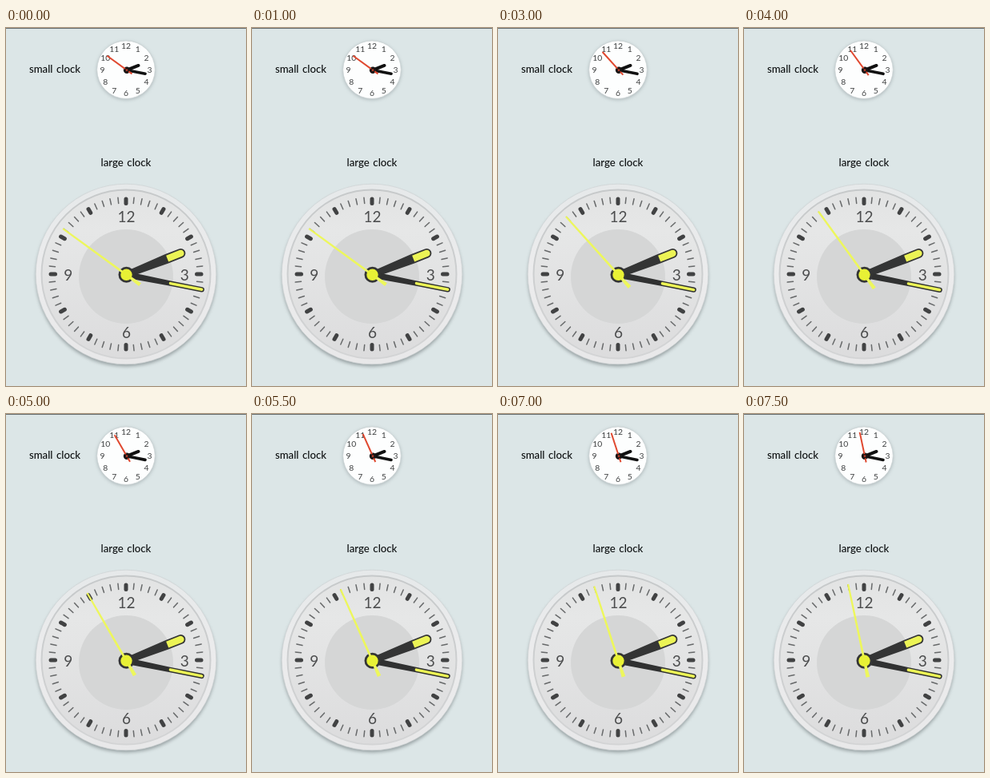
These frames come from a looping animation (300x448 px, 8 s). An HTML page:

```html
<!DOCTYPE html>
<html lang="en">
<head>
<meta charset="utf-8">
<title>Two clocks</title>
<style>
html, body { margin: 0; width: 100%; height: 100%; overflow: hidden; background: #dce6e7; }
svg { display: block; }
text { font-family: Lato, "Open Sans", sans-serif; text-anchor: middle; }
.label { font-size: 13.2px; font-weight: 500; word-spacing: 1.2px; fill: #0c0f10; }
.small text { font-size: 10.4px; fill: #3e4041; }
.large text { font-size: 19px; fill: #4c4d4e; }
</style>
</head>
<body>
<svg width="300" height="448" viewBox="0 0 300 448">
  <defs>
    <linearGradient id="rim" x2="0" y2="1">
      <stop offset="0" stop-color="#e6e9ea"/>
      <stop offset=".5" stop-color="#ececed"/>
      <stop offset="1" stop-color="#e8e8e9"/>
    </linearGradient>
    <linearGradient id="lip" x2="0" y2="1">
      <stop offset="0" stop-color="#c6c9ca"/>
      <stop offset="1" stop-color="#d3d4d5"/>
    </linearGradient>
    <linearGradient id="face" x2="0" y2="1">
      <stop offset="0" stop-color="#e2e3e3"/>
      <stop offset=".25" stop-color="#e6e7e7"/>
      <stop offset="1" stop-color="#dcdcdd"/>
    </linearGradient>
    <filter id="blur" x="-20%" y="-20%" width="140%" height="140%">
      <feGaussianBlur stdDeviation="2.2"/>
    </filter>
  </defs>
  <path d="M0 .5H300" stroke="#686f71"/>
  <text class="label" x="61" y="56">small clock</text>
  <text class="label" x="150" y="173">large clock</text>

  <g class="small" transform="translate(150 52.2)">
    <circle cy="1.3" r="36.5" fill="#8e999c" opacity=".6" filter="url(#blur)"/>
    <circle r="36.3" fill="#fdfefe" stroke="#cbd2d4" stroke-width=".8"/>
    <g id="smallNumbers"></g>
    <g transform="translate(1 .5)" stroke-linecap="round">
      <path class="hour" d="M0 0V-15.6" stroke="#111" stroke-width="4"/>
      <path class="minute" d="M0 0V-23.5" stroke="#111" stroke-width="3.6"/>
      <circle r="4.2" fill="#161515"/>
      <path class="second" d="M0 8V-30.5" stroke="#e0482f" stroke-width="2" stroke-linecap="butt"/>
      <circle r="2.8" fill="#241817"/>
      <circle r="1.1" fill="#e0482f"/>
    </g>
  </g>

  <g class="large" transform="translate(150 308)">
    <circle cy="3" r="112.5" fill="#6f797b" opacity=".65" filter="url(#blur)"/>
    <circle r="112.8" fill="url(#rim)" stroke="#cfd3d4" stroke-width=".7"/>
    <circle r="105.5" fill="url(#face)" stroke="url(#lip)" stroke-width="2"/>
    <circle cy="3" r="59" fill="#d5d6d6"/>
    <g id="ticks" stroke-linecap="round"></g>
    <g id="largeNumbers" transform="translate(.5 0)"></g>
    <g transform="translate(.5 .8)" stroke-linecap="round">
      <g class="hour">
        <path d="M-4 0L-6 -54V-73A6 6 0 0 1 6 -73V-54L4 0Z" fill="#343535"/>
        <path d="M-4.2 -55V-73A4.2 4.2 0 0 1 4.2 -73V-55Z" fill="#ecf455"/>
      </g>
      <g class="minute">
        <path d="M-4 0L-3.2 -55V-96A3.2 3.2 0 0 1 3.2 -96V-55L4 0Z" fill="#303131"/>
        <path d="M0 -56V-96" stroke="#ecf455" stroke-width="3.4"/>
      </g>
      <circle r="10" fill="#343535"/>
      <path class="second" d="M-1.1 -98H1.1L1.4 0L2.4 21H-2.4L-1.4 0Z" fill="#edf75c"/>
      <circle r="7.2" fill="#e8f135"/>
    </g>
  </g>
</svg>
<script>
const $ = id => document.getElementById(id);

function numbers(step, radius, drop) {
  let out = '';
  for (let n = step; n <= 12; n += step) {
    const a = n * Math.PI / 6;
    out += `<text x="${radius * Math.sin(a)}" y="${drop - radius * Math.cos(a)}">${n}</text>`;
  }
  return out;
}

$('smallNumbers').innerHTML = numbers(1, 29.6, 3.7);
$('largeNumbers').innerHTML = numbers(3, 72.8, 7.5);

for (let i = 0; i < 60; i++) {
  const shape = i % 5
    ? 'd="M0 -89V-96.3" stroke="#67696a" stroke-width="1.5"'
    : 'd="M0 -88.5V-94" stroke="#414243" stroke-width="5"';
  $('ticks').innerHTML += `<path ${shape} transform="rotate(${i * 6})"/>`;
}

function turn(name, angle) {
  for (const hand of document.querySelectorAll('.' + name))
    hand.setAttribute('transform', `rotate(${angle})`);
}

function draw(now) {
  const t = now % 8000;
  // The clock starts at 2:16:51 and ticks on the half second.
  const seconds = 51 + Math.max(0, Math.floor((t - 500) / 1000));
  const minutes = 16 + seconds / 60;
  turn('second', seconds * 6);
  turn('minute', minutes * 6);
  turn('hour', 60 + minutes / 2);
}

const start = performance.now();
function loop() {
  draw(performance.now() - start);
  requestAnimationFrame(loop);
}
loop();
</script>
</body>
</html>
```
